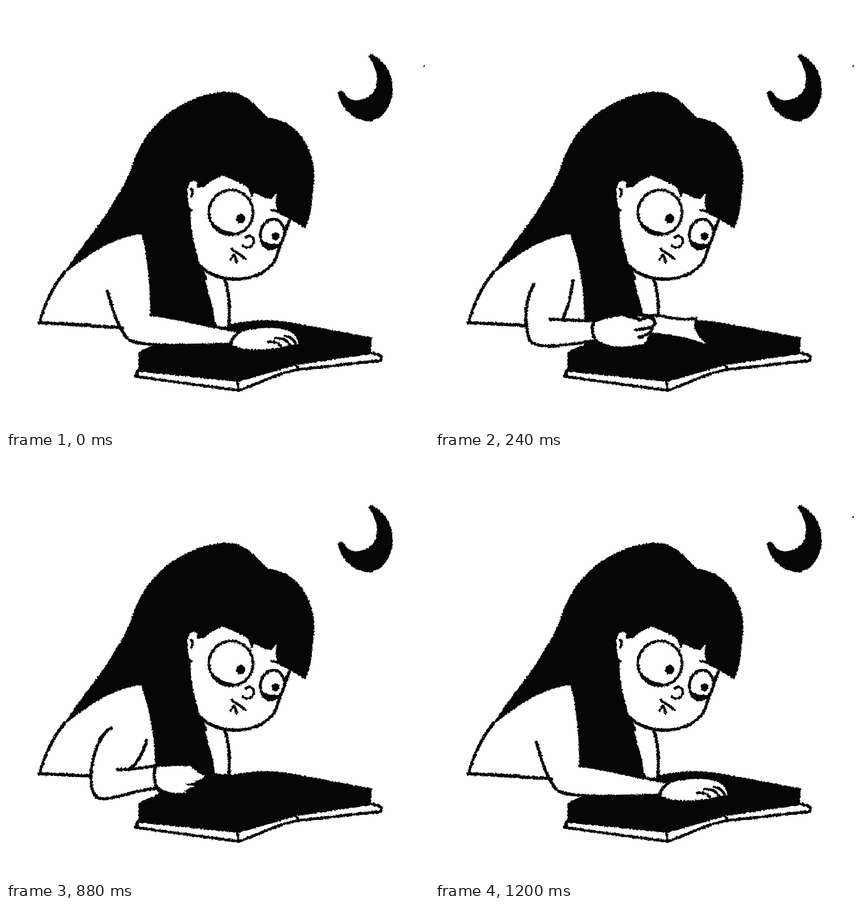
An HTML page for the animation above (1280 ms loop, 748 by 748 pixels).

```html
<!DOCTYPE html>
<html lang="en">
<head>
<meta charset="utf-8">
<title>Night reader</title>
<style>
html, body { margin: 0; width: 100%; height: 100%; overflow: hidden; background: #fefefe; }
svg { display: block; width: 100vw; height: 100vh; }
.ink { fill: #060606; }
.line { fill: none; stroke: #060606; stroke-width: 5.6; stroke-linecap: round; stroke-linejoin: round; }
.thin { stroke-width: 4.5; }
.paper { fill: #fefefe; }
.sheet { fill: #fefefe; stroke: #060606; stroke-width: 5; stroke-linejoin: round; }

/* One slot is 80 ms; --at is the moment a pose appears. */
.pose, .speck { visibility: hidden; animation: slot 1280ms step-end infinite; }
.pose { animation-delay: calc(var(--at) - 1280ms); }
.rest { animation-name: rest; }
.speck { animation-name: speck; }
.pupil { animation: look 1280ms step-end infinite; }
@keyframes slot { 0% { visibility: visible; } 6.25%, 100% { visibility: hidden; } }
@keyframes rest { 0% { visibility: visible; } 43.75%, 100% { visibility: hidden; } }
@keyframes speck {
  0%, 50%, 93.75% { visibility: visible; }
  37.5%, 56.25% { visibility: hidden; }
  100% { visibility: visible; }
}
@keyframes look {
  0%, 68.75%, 100% { transform: none; }
  37.5%, 56.25% { transform: translate(var(--dx), 1px); }
  50% { transform: translate(calc(var(--dx) * 1.7), 2px); }
}
</style>
</head>
<body>
<svg viewBox="0 0 748 748">
<defs>
  <!-- opaque noise keeps the displacement centred on zero -->
  <filter id="chalk" filterUnits="userSpaceOnUse" x="0" y="0" width="748" height="748" color-interpolation-filters="sRGB">
    <feTurbulence type="fractalNoise" baseFrequency=".3" numOctaves="2" seed="4"/>
    <feColorMatrix values="1 0 0 0 0  0 1 0 0 0  0 0 1 0 0  0 0 0 0 1" result="grain"/>
    <feDisplacementMap in="SourceGraphic" in2="grain" scale="5" xChannelSelector="R" yChannelSelector="G"/>
  </filter>

  <g id="fist">
    <path class="paper" d="M297 563C315 556 333 551 349 551Q364 555 378 560Q393 553 402 559Q407 567 399 575Q402 583 390 590Q391 598 384 602Q350 610 327 606Q309 601 298 594Q290 578 297 563Z"/>
    <path class="line" d="M297 562Q288 579 300 597M297 562C315 556 333 550 349 551Q364 555 378 560Q393 553 402 559Q407 567 399 573L370 578M399 574Q400 584 376 591"/>
  </g>

  <g id="reach">
    <path class="ink" d="M240 402C249 440 255 485 255 548L272 556L264 450Z"/>
    <path class="paper" d="M371 552H391V567H373Z"/>
    <path class="paper" d="M235 545L256 545C300 548 350 564 413 576L397 598C300 600 240 602 218 592L205 570Z"/>
    <path class="paper" d="M397 599Q402 582 420 575C450 567 488 567 505 577Q519 589 516 598L497 600L485 604Q450 609 420 606Z"/>
    <path class="line" d="M58 560L206 569M179 504C188 535 196 562 210 582Q216 592 228 594C265 603 330 600 396 598M256 546C300 549 350 566 411 575M397 600Q400 585 412 577"/>
    <path class="line thin" d="M463 594Q480 592 486 602M476 587Q495 587 501 598M494 583Q506 586 512 596"/>
  </g>

  <g id="grip">
    <path class="paper" d="M197 553L265 546Q300 542 325 543L348 561Q357 568 331 573L338 574L316 579L334 582L315 590L322 597Q289 602 267 586C225 592 195 607 165 604L152 585Z"/>
    <path class="line" d="M58 560L148 564M186 479C161 494 152 536 150 565C150 591 156 602 167 604C190 607 216 591 265 586M249 500Q241 532 222 549M197 553Q232 552 265 546Q257 568 270 590M265 546Q298 542 326 544L348 560M268 586Q288 601 320 596"/>
  </g>

  <g id="lift">
    <path class="paper" d="M209 555L297 562L300 597Q225 610 195 598L180 575Z"/>
    <path class="line" d="M58 560L168 565M164 507C163 542 172 582 194 598C215 609 262 602 300 596M239 473C230 500 227 530 231 553M209 555Q255 558 297 562"/>
    <use href="#fist"/>
  </g>
</defs>

<g filter="url(#chalk)">
  <!-- moon -->
  <path class="ink" d="M642 86Q647 83 652 88C672 100 684 122 684 150C682 181 662 203 640 204C613 201 591 181 587 152Q592 146 598 153Q603 165 618 167C633 166 645 160 651 150C660 136 657 113 642 90Z"/>
  <path class="ink speck" d="M738 105h2.5v3h-2.5z"/>

  <!-- hair -->
  <path class="ink" d="M102 474C126 432 163 393 188 350C207 320 214 308 224 279C239 240 256 214 289 188C325 163 365 150 398 152C430 157 446 183 464 197C490 202 506 210 522 230C540 255 547 285 545 310C541 335 542 368 529 394L502 376L485 369Q477 360 477 346L478 331L469 341L462 341L438 330L435 337L428 321Q405 308 383 300Q363 308 350 320L338 322L337 308C322 303 317 320 318 337C319 354 323 363 327 362C324 385 334 430 346 464Q356 498 367 540L372 580L264 570C264 525 262 490 250 440L239 403C213 406 182 418 153 437Q126 455 102 474Z"/>

  <!-- face and body -->
  <path class="line" d="M342 459C358 476 385 484 412 483C442 481 466 468 477 447C485 425 491 400 502 379M347 470L353 482M387 484C395 505 396 535 394 566M104 470C84 495 66 530 60 560L148 564"/>
  <path class="line thin" d="M337 308C321 303 317 322 319 338Q321 360 328 361M327 323Q333 330 328 337M424 409C431 403 440 409 438 418C436 428 425 429 419 424M470 361Q485 362 503 376M431 322L435 336"/>
  <path class="line thin" d="M399 430L424 447M403 440L397 448M405 442L408 453"/>
  <ellipse class="sheet" cx="398" cy="365" rx="39" ry="39.5"/>
  <path class="ink" d="M359 369C366 391 388 401 412 401C386 413 358 396 359 369Z"/>
  <ellipse class="sheet" cx="471" cy="403" rx="21" ry="26" transform="rotate(12 471 403)"/>
  <path class="ink" d="M449 410Q463 425 485 419Q478 434 464 432Q449 426 449 410Z"/>
  <circle class="ink pupil" style="--dx:-10px" cx="415" cy="376" r="8"/>
  <circle class="ink pupil" style="--dx:-7px" cx="477" cy="407" r="7"/>

  <!-- book -->
  <path class="sheet" d="M233 644L229 655L412 680C445 668 485 648 515 643L662 627L664 619L646 613L515 632L411 662Z"/>
  <path class="ink" d="M235 646L234 613Q242 606 262 600L300 570L370 559L400 562C430 555 465 553 502 559L560 570L647 586L645 616L515 634C475 640 440 655 411 664Z"/>
  <path class="line thin" d="M233 644V655M409 662L411 680M512 633L517 643"/>

  <!-- hand resting on the right page -->
  <g class="pose" style="--at:0ms"><use href="#reach"/></g>
  <g class="pose" style="--at:1200ms"><use href="#reach"/></g>

  <!-- corner picked up -->
  <g class="pose" style="--at:80ms">
    <path class="sheet" d="M428 546Q500 561 551 541Q524 568 512 615Q480 598 440 584Z"/>
    <path class="paper" d="M232 550L350 563L352 598Q240 604 206 592L190 570Z"/>
    <path class="line" d="M58 560L184 567M171 505C174 540 185 582 207 592C240 605 300 601 352 598M236 502Q232 530 235 548M232 550Q290 554 350 564"/>
    <use href="#fist" x="52" y="2"/>
  </g>

  <!-- page coming over -->
  <g class="pose" style="--at:160ms">
    <path class="paper" d="M376 541C412 552 458 555 490 537C470 560 475 583 508 613Q455 585 400 582Z"/>
    <path class="line" d="M381 557L376 541C412 552 458 555 490 537C470 560 475 583 508 613"/>
    <use href="#lift"/>
  </g>
  <g class="pose" style="--at:240ms">
    <path class="sheet" d="M352 546L400 548Q438 557 462 552Q452 577 497 608Q450 585 380 580Z"/>
    <path class="paper" d="M203 554L282 557L285 592Q200 608 168 592L165 570Z"/>
    <path class="line" d="M58 560L158 565M175 492C159 520 156 562 168 592C181 608 230 600 285 592M244 486Q239 525 227 551M203 554L282 557"/>
    <use href="#fist" x="-15" y="-5"/>
  </g>

  <!-- reading -->
  <g class="pose rest" style="--at:320ms">
    <use href="#grip"/>
    <path class="sheet" d="M335 547L368 548L413 561L427 574L390 580L368 567Z"/>
    <path class="paper" d="M431 582Q463 585 488 606Q461 592 431 582Z"/>
  </g>

  <!-- smoothing the left page -->
  <g class="pose" style="--at:880ms"><use href="#grip"/></g>
  <g class="pose" style="--at:960ms">
    <path class="ink" d="M264 535H369L375 560V602L270 612Z"/>
    <path class="paper" d="M185 550Q220 541 242 546Q261 557 288 563L288 569L268 572Q276 582 275 594L271 603L277 614Q256 620 232 613Q218 604 213 594L162 603L152 580Z"/>
    <path class="line" d="M58 560L148 564M191 475C166 504 150 534 148 565C146 590 152 602 163 603L212 595M243 502Q224 524 219 544M184 550Q222 541 242 546Q261 557 288 564M211 582Q217 608 232 613Q236 615 241 613M234 592Q236 608 246 614Q252 617 258 614M250 596Q254 612 263 615L277 614M267 573Q261 585 268 599"/>
  </g>
  <g class="pose" style="--at:1040ms"><use href="#grip"/></g>
  <g class="pose" style="--at:1120ms">
    <use href="#lift"/>
    <path class="line thin" d="M371 547L376 553"/>
  </g>
</g>
</svg>
</body>
</html>
```
